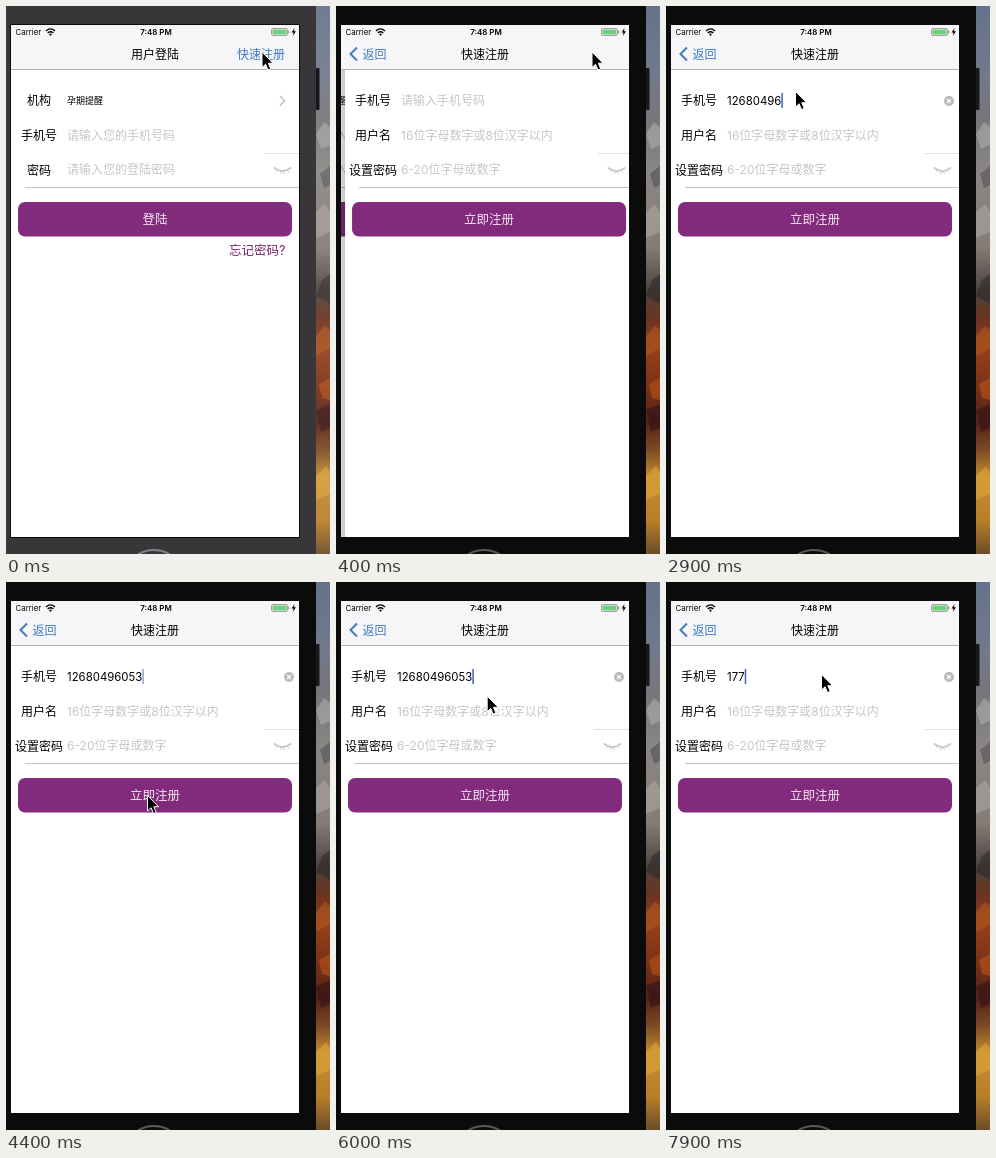
An HTML page that plays this animation: 324x548 px, repeating every 8 s.

```html
<!DOCTYPE html>
<html lang="zh">
<head>
<meta charset="utf-8">
<title>快速注册</title>
<style>
html, body { margin: 0; width: 100%; height: 100%; overflow: hidden; background: #0b0b0b; }
svg { display: block; width: 324px; height: 548px; }
text { font: 12px Inter, "Noto Sans CJK SC", "Noto Sans CJK", sans-serif; fill: #000; white-space: pre; }
.hint { fill: #c6c6cb; }
.title { font-weight: 500; text-anchor: middle; }
.blue { fill: #3f7bc2; }
.button { font-size: 12.5px; fill: #f3e6f2; text-anchor: middle; }
.status { font-size: 7.9px; }
</style>
</head>
<body>
<svg viewBox="0 0 324 548">
  <defs>
    <clipPath id="screen"><rect x="5" y="19" width="288" height="512"/></clipPath>
    <linearGradient id="photo" x1="0" y1="0" x2="0" y2="1">
      <stop offset="0" stop-color="#65728a"/>
      <stop offset=".12" stop-color="#717a8c"/>
      <stop offset=".2" stop-color="#77757a"/>
      <stop offset=".3" stop-color="#8a8685"/>
      <stop offset=".44" stop-color="#857c76"/>
      <stop offset=".52" stop-color="#4c423e"/>
      <stop offset=".57" stop-color="#6a3420"/>
      <stop offset=".63" stop-color="#94401a"/>
      <stop offset=".69" stop-color="#7c3216"/>
      <stop offset=".76" stop-color="#562218"/>
      <stop offset=".81" stop-color="#7c4a24"/>
      <stop offset=".86" stop-color="#c48c30"/>
      <stop offset=".94" stop-color="#b87e28"/>
      <stop offset="1" stop-color="#6a4c28"/>
    </linearGradient>
    <linearGradient id="edge">
      <stop offset="0" stop-color="#000" stop-opacity="0"/>
      <stop offset="1" stop-color="#000" stop-opacity=".14"/>
    </linearGradient>
    <g id="eye" fill="none" stroke="#c9c9cd" stroke-width="2" stroke-linecap="round">
      <path d="M268.500 162Q276.500 168.500 284.500 162"/>
      <path d="M271 165l-.8 1M275 166.500l-.2 1M278 166.500l.2 1M282 165l.8 1" stroke-width="1"/>
    </g>
    <g id="rules" fill="none" stroke="#cfcfd2">
      <path d="M19 181.500H293" stroke="#c2c2c6"/>
      <path d="M258 147.500H293" stroke="#e0e0e3"/>
    </g>
    <rect id="bar" x="12" y="196" width="274" height="34.500" rx="7" fill="#822a7c"/>
  </defs>

  <rect x="310" width="14" height="548" fill="url(#photo)"/>
  <g opacity=".55">
    <path d="M310 128l8-12 6 5v18l-9 4z" fill="#b3b1b2"/>
    <path d="M324 160l-10 8 4 14 6-3z" fill="#504c50"/>
    <path d="M310 206l9-8 5 8v20l-14 6z" fill="#b0a9a3"/>
    <path d="M324 268l-8 6-6 16 14 8z" fill="#2c2626"/>
    <path d="M310 330l9-10 5 4v18l-14 8z" fill="#b85a20"/>
    <path d="M324 372l-11 6 3 14 8 2z" fill="#c0581c"/>
    <path d="M310 404l14-6v24l-9 4z" fill="#2c1012"/>
    <path d="M310 470l10-10 4 6v22l-14 6z" fill="#e0a83c"/>
  </g>
  <rect id="glow" x="310" width="14" height="548" fill="#fff"/>
  <rect id="bezel" width="310" height="548"/>
  <rect x="4.500" y="18.500" width="289" height="513" fill="none" stroke="#0b0b0b"/>
  <rect x="310" y="62" width="3.500" height="42" rx="1" fill="#17161a"/>
  <circle id="home" cx="148" cy="574.500" r="30.500" fill="none" stroke-width="1.800"/>

  <g clip-path="url(#screen)">
    <rect x="5" y="19" width="288" height="512" fill="#fff"/>

    <g id="login">
      <text x="21" y="99.400">机构</text>
      <text x="61" y="98.300" style="font-size:9px">孕期提醒</text>
      <path d="M274 90l4.500 4.700-4.500 4.700" fill="none" stroke="#bdbdc2" stroke-width="1.500"/>
      <text x="15" y="134.400">手机号</text>
      <text class="hint" x="61" y="133.600">请输入您的手机号码</text>
      <text x="21" y="169">密码</text>
      <text class="hint" x="61" y="168.400">请输入您的登陆密码</text>
      <use href="#rules"/><use href="#eye"/><use href="#bar"/>
      <text class="button" x="149" y="217.700">登陆</text>
      <text x="223" y="249.400" style="font-size:12.500px;fill:#74246f">忘记密码?</text>
    </g>
    <rect id="dim" x="5" y="64" width="288" height="467"/>

    <g id="signup">
      <rect x="-1" y="64" width="6" height="467" fill="url(#edge)"/>
      <rect x="5" y="64" width="288" height="467" fill="#fff"/>
      <text x="15" y="99.400">手机号</text>
      <text id="phoneHint" class="hint" x="61" y="98.900">请输入手机号码</text>
      <text id="phone" x="61" y="98.900" style="font-size:11.400px"></text>
      <rect id="caret" y="87" width="1.500" height="15" fill="#3568b8"/>
      <g id="clear">
        <circle cx="283" cy="95" r="5" fill="#b9b9be"/>
        <path d="M281 93l4 4m0-4l-4 4" stroke="#fff" stroke-width="1.100"/>
      </g>
      <text x="15" y="134.400">用户名</text>
      <text class="hint" x="61" y="133.600">16位字母数字或8位汉字以内</text>
      <text x="9" y="169">设置密码</text>
      <text class="hint" x="61" y="168.400">6-20位字母或数字</text>
      <use href="#rules"/><use href="#eye"/><use href="#bar"/>
      <text class="button" x="149" y="217.700">立即注册</text>
    </g>

    <rect x="5" y="19" width="288" height="45" fill="#f6f6f9"/>
    <path d="M5 63.500H293" stroke="#b0b0b8"/>
    <text class="status" x="9.500" y="29">Carrier</text>
    <g fill="none" stroke="#000" stroke-width="1.300">
      <path d="M40 25Q44.500 20.800 49 25M41.700 27Q44.500 24.500 47.300 27"/>
      <circle cx="44.500" cy="28.600" r=".5"/>
    </g>
    <text class="status" x="150" y="29" style="font-weight:600;text-anchor:middle">7:48 PM</text>
    <rect x="265.500" y="22.500" width="16" height="7" rx="1.500" fill="none" stroke="#8b8b8f" stroke-width=".8"/>
    <rect x="266.500" y="23.500" width="14" height="5" fill="#74cf7a"/>
    <path d="M282.800 24.500v3" stroke="#8b8b8f"/>
    <path d="M288.500 22l-3 4.500h2l-.7 3.500 3.200-4.700h-2z"/>

    <g id="oldNav">
      <text id="oldTitle" class="title" x="149" y="52.600">用户登陆</text>
      <text class="blue" x="231" y="52.600">快速注册</text>
    </g>
    <g id="newNav">
      <path d="M21 41.500l-6.500 6.500 6.500 6.500" fill="none" stroke="#3f7bc2" stroke-width="2"/>
      <text class="blue" x="26.500" y="52.800">返回</text>
      <text id="newTitle" class="title" x="149" y="52.600">快速注册</text>
    </g>
  </g>

  <path id="cursor" d="M0 0V15.500L3.600 12.200 6 18 8.700 16.900 6.300 11.200H11Z" fill="#000" stroke="#fff" stroke-width="1"/>
</svg>
<script>
const LOOP = 8000, WIDTH = 288, FOCUS = 1200;
const NUMBER = "12680496053", RETRY = "177";
const $ = id => document.getElementById(id);
const clamp = v => Math.max(0, Math.min(1, v));
const fade = (id, v) => $(id).setAttribute("opacity", +v);
const shift = (id, x, y = 0) => $(id).setAttribute("transform", `translate(${x} ${y})`);

// [time, text length]: typing, erasing, then typing again
const edits = [[0, 0]];
for (let i = 1; i <= 11; i++) edits.push([1400 + 185 * i, i]);
for (let i = 1; i <= 3; i++) edits.push([6600 + 100 * i, 11 - i]);
for (let i = 1; i <= 8; i++) edits.push([7050 + 55 * i, 8 - i]);
for (let i = 1; i <= 3; i++) edits.push([7500 + 100 * i, i]);

// [time, x, y] of the pointer tip
const path = [
  [0, 256, 46], [500, 256, 46], [1100, 129.5, 85.5], [3500, 129.5, 85.5], [4250, 141.5, 213.5],
  [4550, 141.5, 213.5], [5000, 133.5, 202.5], [5500, 133.5, 202.5], [6200, 155.5, 92.5], [LOOP, 155.5, 92.5]
];

function pointer(t) {
  const i = path.findIndex(k => k[0] > t);
  const [t0, x0, y0] = path[i - 1], [t1, x1, y1] = path[i];
  const u = (t - t0) / (t1 - t0), e = u * u * (3 - 2 * u);
  return [x0 + (x1 - x0) * e, y0 + (y1 - y0) * e];
}

function blink(t, lastEdit) {
  if (t < FOCUS) return 0;
  if (t - lastEdit < 400) return 1;
  const phase = (t + 100) % 1000;
  return phase < 620 ? clamp((620 - phase) / 200) : clamp((phase - 800) / 150);
}

function draw(t) {
  const away = t < 100 ? 1 : t < 550 ? Math.exp(-(t - 60) / 80) : 0;
  const bright = t < 100;

  $("bezel").setAttribute("fill", bright ? "#383639" : "#0b0b0b");
  $("home").setAttribute("stroke", bright ? "#85808a" : "#5c585c");
  fade("glow", bright ? .07 : 0);

  shift("login", -.3 * WIDTH * (1 - away));
  fade("dim", .1 * (1 - away));
  shift("signup", WIDTH * away);
  fade("signup", away < 1);
  fade("oldNav", clamp(away * 1.6 - .6));
  shift("oldTitle", -100 * (1 - away));
  fade("newNav", clamp(1 - away * 1.3));
  shift("newTitle", 100 * (away < .02 ? 0 : away));

  const [lastEdit, count] = edits.filter(k => k[0] <= t).pop();
  const value = (t > 7550 ? RETRY : NUMBER).slice(0, count);
  const phone = $("phone");
  if (phone.textContent !== value) phone.textContent = value;
  fade("phoneHint", !count);
  fade("clear", count > 0);
  $("caret").setAttribute("x", 61 + (count ? phone.getComputedTextLength() : 0));
  fade("caret", blink(t, lastEdit));

  shift("cursor", ...pointer(t));
}

const start = performance.now();
function tick() {
  draw((performance.now() - start) % LOOP);
  requestAnimationFrame(tick);
}
tick();
</script>
</body>
</html>
```
